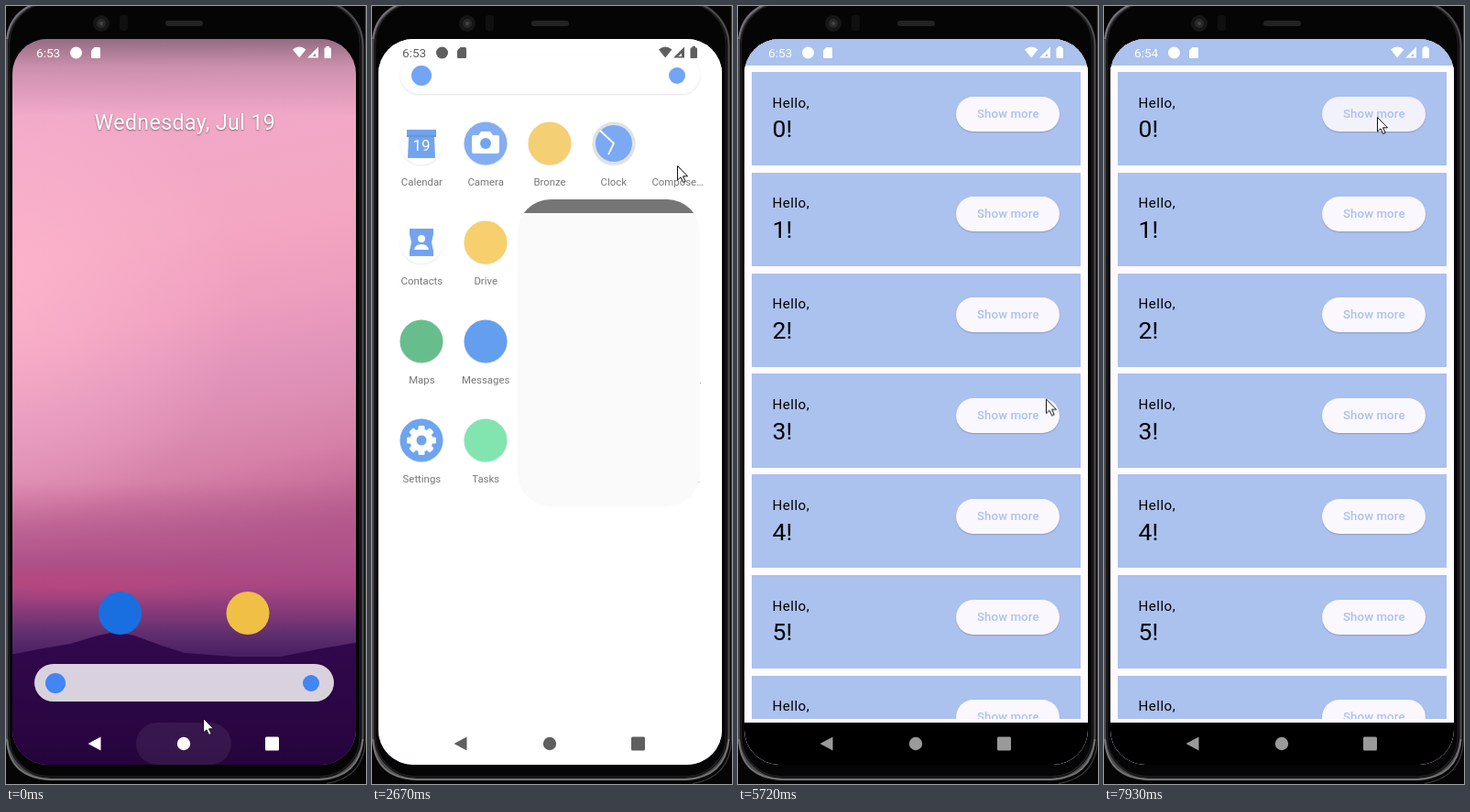
An HTML page for the animation above (8 s loop, 393 by 849 pixels).

```html
<!DOCTYPE html>
<html lang="en">
<head>
<meta charset="utf-8">
<title>Phone demo</title>
<style>
html, body { margin: 0; width: 100%; height: 100%; overflow: hidden; background: #000; }
body { position: relative; font-family: Roboto, sans-serif; }
div, svg, span { position: absolute; }
svg { overflow: visible; }
.full { left: 0; top: 0; width: 393px; height: 849px; }
.screen { clip-path: inset(36px 11px 21px 7px round 38px); }
.t { animation: 8s linear infinite; }
.s { animation: 8s step-end infinite; }

/* home */
.wall {
  background:
    linear-gradient(rgba(60,50,60,.5) 36px, rgba(60,50,60,.2) 66px, transparent 120px),
    radial-gradient(ellipse 260px 26px at 70px 632px, rgba(200,72,126,.45), transparent),
    linear-gradient(transparent 520px, rgba(176,82,138,.75) 590px, #a84883 630px, #8a3b79 658px, #64306f 682px, #4a2264 706px),
    radial-gradient(ellipse 260px 260px at 0 310px, rgba(255,184,206,.7), transparent),
    linear-gradient(168deg, #eda6c8 60px, #f0a8c8 150px, #f4a7c2 280px, #ee9ebe 370px, #e294ba 440px,
      #dd8db2 490px, #d681a8 540px, #c46d99 590px, #b45a8c 640px);
}
.date { left: 0; top: 114px; width: 391px; text-align: center; color: #fff; font-size: 23px; line-height: 28px;
  letter-spacing: .45px; text-shadow: 0 1px 2px rgba(0,0,0,.45); }
.home { animation-name: home; }
@keyframes home {
  0%, 13.75% { transform: none; opacity: 1; }
  14.75% { transform: translateY(-5px); opacity: 1; }
  17% { transform: translateY(-50px); opacity: 0; }
  100% { transform: translateY(-50px); opacity: 0; }
}

/* app drawer */
.veil { background: #fdfdfd; animation-name: veil; }
@keyframes veil { 0%, 15% { opacity: 0; } 18.5%, 100% { opacity: 1; } }
.launch { animation-name: launch; }
@keyframes launch {
  0%, 31.75% { transform: none; opacity: 1; }
  33.375% { transform: translateY(-23px); opacity: .75; }
  36.25%, 100% { transform: translateY(-46px); opacity: 0; }
}
.drawer { animation-name: drawer; }
@keyframes drawer {
  0%, 13.75% { transform: translateY(640px); }
  14.75% { transform: translateY(623px); }
  15.6% { transform: translateY(550px); }
  16.75% { transform: translateY(310px); }
  18.1% { transform: translateY(80px); }
  20%, 100% { transform: none; }
}
.sheet { left: 7px; top: 55px; width: 375px; height: 850px; border-radius: 14px 14px 0 0; background: #fff; animation-name: sheet; }
@keyframes sheet { 0%, 13.75% { opacity: 0; } 14.75% { opacity: .09; } 18%, 100% { opacity: 1; } }
.search { left: 30.5px; top: 77.5px; width: 327.5px; height: 41.5px; border-radius: 21px; background: rgba(255,255,255,.82); box-shadow: 0 1px 2px rgba(0,0,0,.16); }
.search i { position: absolute; top: 10px; left: 12.5px; width: 22px; height: 22px; border-radius: 50%; background: #4285f4; }
.search i + i { left: 293.5px; top: 12px; width: 18px; height: 18px; }
.grid { animation-name: grid; }
@keyframes grid { 0%, 13.75% { opacity: 0; } 14.75% { opacity: .17; } 17%, 100% { opacity: 1; } }
.app svg { left: -24px; top: -24px; }
.app span { left: -35px; top: 34px; width: 70px; text-align: center; font-size: 11.4px; line-height: 16px; color: #484848; }
.tap svg { animation: tap 8s step-end infinite; }
@keyframes tap { 0% { opacity: 1; } 31.75%, 100% { opacity: 0; } }

/* opening window */
.win { overflow: hidden; background: #fafafa; animation-name: win; }
.win::before { content: ""; display: block; padding-top: 7.6%; background: #757575; }
@keyframes win {
  0%, 31.74% { left: 309px; top: 148px; width: 48px; height: 48px; border-radius: 24px; opacity: 0; }
  31.75% { left: 309px; top: 148px; width: 48px; height: 48px; border-radius: 24px; opacity: 1; }
  33.375% { left: 160px; top: 212.5px; width: 198px; height: 331.5px; border-radius: 36px; opacity: 1; }
  34.3% { left: 69px; top: 106px; width: 304px; height: 590px; border-radius: 37px; opacity: 1; }
  35.4% { left: 22px; top: 51px; width: 358px; height: 750px; border-radius: 38px; opacity: 1; }
  37%, 100% { left: 7px; top: 36px; width: 375px; height: 792px; border-radius: 38px; opacity: 1; }
}
.navbar { left: 7px; top: 782px; width: 375px; height: 46px; background: #000; animation-name: navbar; }
@keyframes navbar { 0% { opacity: 0; } 38.625%, 100% { opacity: 1; } }

/* sample app */
.page { left: 7px; top: 36px; width: 375px; height: 746px; background: #fffbff; animation-name: page; }
.page::before { content: ""; display: block; height: 28.5px; background: #abc1ee; }
@keyframes page { 0% { opacity: 0; } 43%, 100% { opacity: 1; } }
.welcome { animation-name: welcome; }
@keyframes welcome { 0% { opacity: 0; } 43% { opacity: 1; } 63%, 100% { opacity: 0; } }
.body { font-size: 15.15px; line-height: 22.7px; letter-spacing: .473px; white-space: pre; }
.welcome .body { left: 0; top: 367px; width: 389px; text-align: center; color: #1c1b1f; }
.btn { height: 38px; padding: 0 22.7px; border-radius: 19px; font-weight: 500; font-size: 13.25px; line-height: 38px; letter-spacing: .095px; white-space: nowrap; }
.go { left: 144px; top: 414.5px; width: 100.5px; padding: 0; text-align: center; background: #abc1ee; color: #000; animation-name: press; }
@keyframes press { 0%, 60% { background: #abc1ee; } 61.5%, 100% { background: #9db2dd; } }
.list { left: 14.5px; top: 72px; width: 359.8px; height: 706px; overflow: hidden; animation-name: list; }
@keyframes list { 0% { opacity: 0; } 63%, 100% { opacity: 1; } }
.card { position: relative; height: 102.2px; margin-bottom: 7.6px; overflow: hidden; background: #abc1ee; color: #000; }
.card .body { left: 23px; top: 22.7px; }
.num { left: 23px; top: 45.4px; font-size: 26.5px; line-height: 34.1px; }
.card .note { left: 32.5px; top: 89px; }
.more, .less { right: 23px; top: 26.6px; background: #faf8fe; color: #abc1ee; box-shadow: 0 1px 1.5px rgba(0,0,0,.2); }
.card:first-child { animation: grow 8s linear infinite; }
.card:first-child .more { animation: more 8s step-end infinite; }
.less, .note { animation: open 8s step-end infinite; }
.less { background: #f2f2fa; }
@keyframes open { 0% { opacity: 0; } 81.875% { opacity: 1; } 94.75%, 100% { opacity: 0; } }
@keyframes more {
  0% { opacity: 1; background: #faf8fe; }
  81.875% { opacity: 0; background: #f2f2fa; }
  94.75%, 100% { opacity: 1; background: #f2f2fa; }
}
/* bouncy spring: damping .5, stiffness 200 */
@keyframes grow {
  0%, 81.87% { height: 102.2px; }
  81.875%, 81.99% { height: 143.8px; }
  82.75% { height: 156.2px; }
  83.74% { height: 182px; }
  84.61% { height: 194.6px; }
  85.49% { height: 196.2px; }
  86.36% { height: 192.8px; }
  87.24% { height: 189.4px; }
  88.11% { height: 188.1px; }
  88.99% { height: 188.2px; }
  89.86% { height: 188.8px; }
  92.375%, 94.74% { height: 189.2px; }
  94.75% { height: 147.6px; }
  95.625% { height: 132.4px; }
  96.5% { height: 109.4px; }
  96.89%, 100% { height: 102.2px; }
}

/* system bars */
.status { animation-name: status; }
@keyframes status { 0% { color: #fff; } 18.5% { color: #5f5f5f; } 37%, 100% { color: #fff; } }
.clock { left: 33px; top: 43px; font-size: 13.6px; line-height: 16px; }
.now { animation-name: now; }
.next { animation-name: next; }
@keyframes now { 0% { opacity: 1; } 96.5%, 100% { opacity: 0; } }
@keyframes next { 0% { opacity: 0; } 96.5%, 100% { opacity: 1; } }
.nav { animation-name: nav; }
@keyframes nav { 0% { color: #fff; } 18.5% { color: #5f5f5f; } 38.625% { color: #c8c8c8; } 60%, 100% { color: #9a9a9a; } }
.ripple { left: 142px; top: 782px; width: 104px; height: 46px; border-radius: 23px; background: rgba(255,255,255,.07); animation-name: ripple; }
@keyframes ripple { 0%, .9% { opacity: 1; } 5%, 100% { opacity: 0; } }

/* pointer */
.mouse { left: 0; top: 0; animation-name: mouse; }
@keyframes mouse {
  0%, .9% { transform: translate(215px, 777px); }
  5% { transform: translate(203px, 735px); }
  9.4%, 11.1% { transform: translate(194px, 683px); }
  14.75% { transform: translate(194px, 546px); }
  17.5% { transform: translate(200px, 340px); }
  20.6% { transform: translate(268px, 234px); }
  24.1%, 42.2% { transform: translate(333px, 174px); }
  49.125% { transform: translate(380px, 487px); }
  50.9%, 51.8% { transform: translate(373px, 492px); }
  58.75%, 62.1% { transform: translate(226px, 438px); }
  65.6%, 70.6% { transform: translate(336px, 446px); }
  71.5% { transform: translate(336px, 429px); }
  76% { transform: translate(318px, 270px); }
  80.1%, 100% { transform: translate(298px, 121px); }
}
.touch { animation-name: touch; }
@keyframes touch {
  0% { opacity: 0; } 10.25% { opacity: 1; } 18.1% { opacity: 0; }
  28.25% { opacity: 1; } 30% { opacity: 0; }
  59.6% { opacity: 1; } 61.25% { opacity: 0; }
  81% { opacity: 1; } 81.875%, 100% { opacity: 0; }
}
</style>
</head>
<body>
<svg class="full" viewBox="0 0 393 849">
  <rect width="393" height="849" fill="#050506"/>
  <g fill="none">
    <rect x="1" y="-5" width="388.5" height="849" rx="48" stroke="#4a494b" stroke-width="2.4"/>
    <rect x="3.5" y="-3" width="383" height="844" rx="44" stroke="#1e1e20" stroke-width="1.5"/>
    <path d="M392.500 0V800Q391 842 350 848.500" stroke="#3c3c3d" stroke-width="1.2"/>
    <path d="M1 36Q4 8 32 -3" stroke="#77707a" stroke-width="2"/>
    <path d="M1 800Q3 842 48 844H342Q386 842 389.500 800" stroke="#737374" stroke-width="2"/>
  </g>
  <circle cx="104" cy="19" r="9" fill="#161617"/>
  <circle cx="104" cy="19" r="5" fill="#29292b"/>
  <circle cx="104" cy="19" r="2" fill="#444"/>
  <rect x="124" y="10" width="9" height="17" rx="3" fill="#101011"/>
  <rect x="174" y="16" width="41" height="6" rx="3" fill="#232324"/>
</svg>

<div class="screen full">
  <div class="wall full"></div>
  <svg class="full" viewBox="0 0 393 849">
    <linearGradient id="hill" x2="0" y2="1"><stop stop-color="#33084e"/><stop offset="1" stop-color="#23043a"/></linearGradient>
    <path fill="url(#hill)" d="M0 709L35 702 70 696 100 687 120 683 140 687 170 698 195 706 250 710 300 710 340 702 393 693V849H0Z"/>
  </svg>
  <div class="home t full">
    <div class="date">Wednesday, Jul 19</div>
    <svg class="full"><circle cx="124.500" cy="662.500" r="23.500" fill="#1a6fe0"/><circle cx="264" cy="662.500" r="23.500" fill="#f0bf45"/></svg>
  </div>
  <div class="veil t full"></div>
  <div class="launch t full">
    <div class="drawer t full">
      <div class="sheet t"></div>
      <div class="search"><i></i><i></i></div>
      <div class="grid t full" id="grid"></div>
    </div>
  </div>
  <div class="ripple t"></div>
  <div class="win t"></div>
  <div class="navbar s"></div>
  <div class="page s"></div>
  <div class="welcome s full">
    <div class="body">Welcome to the Basic Taskpods!</div>
    <div class="btn go t">Continue</div>
  </div>
  <div class="list s" id="list"></div>

  <div class="status s full">
    <span class="clock now s">6:53</span><span class="clock next s">6:54</span>
    <svg class="full" viewBox="0 0 393 849" fill="currentColor">
      <circle cx="76.500" cy="51" r="6.500"/>
      <path d="M96.500 45H101.500Q103 45 103 46.500V55.500Q103 57 101.500 57H94.500Q93 57 93 55.500V48.500Z"/>
      <path d="M313 47.500Q320.200 41.500 327.400 47.500L320.200 56.500Z"/>
      <path d="M341 44.500V56.500H329ZM338 51.500L334.500 55H338Z" fill-rule="evenodd"/>
      <path d="M349.500 44H353V45.500H354Q355 45.500 355 46.500V56Q355 57 354 57H348.500Q347.500 57 347.500 56V46.500Q347.500 45.500 348.500 45.500H349.500Z"/>
    </svg>
  </div>
  <svg class="nav s full" viewBox="0 0 393 849" fill="currentColor">
    <path d="M89.500 805L103.500 797.500V812.500Z"/>
    <circle cx="194" cy="805" r="7.200"/>
    <rect x="283" y="797.500" width="15" height="15" rx="1.500"/>
  </svg>
</div>

<div class="mouse t">
  <svg width="12" height="20">
    <circle class="touch s" r="12" fill="#efb645"/>
    <path d="M.5 .5V16L4 12.800 6.700 18.500 9.200 17.300 6.600 11.800H11.500Z" fill="#fff" stroke="#111"/>
  </svg>
</div>

<script>
const disc = (color, inner = '') =>
  `<svg width="48" height="48" viewBox="-24 -24 48 48"><circle cy="1" r="23.6" fill="#000" opacity=".1"/><circle r="23.5" fill="${color}"/>${inner}</svg>`;
const blue = '#4285e8';
const teeth = [0, 45, 90, 135].map(a => `<rect x="-3.500" y="-16" width="7" height="32" rx="1.500" transform="rotate(${a})"/>`).join('');
const apps = [
  ['Calendar', disc('#fff', `<path d="M-16-15H16V-7H14L15 16H-15L-14-7H-16Z" fill="${blue}"/><path d="M-16-8H16" stroke="#2f68c4" stroke-width="1.500"/><text y="8" font-size="17" text-anchor="middle" fill="#fff">19</text>`)],
  ['Camera', disc('#5b93ee', `<path d="M-5-13H5L8-9H13Q15-9 15-7V9Q15 11 13 11H-13Q-15 11-15 9V-7Q-15-9-13-9H-8Z" fill="#fff"/><circle r="6" fill="${blue}"/>`)],
  ['Bronze', disc('#f0bf45')],
  ['Clock', disc('#d5d8dc', `<circle r="20" fill="#4f8cf0"/><path d="M-15-14L0 0L-6 12" fill="none" stroke="#fff" stroke-width="1.800"/>`)],
  ['Compose…', disc('#e9e6ec')],
  ['Contacts', disc('#fff', `<path d="M-13-15H13V-9L11 0L13 9V15H-13V9L-11 0L-13-9Z" fill="${blue}"/><circle cy="-4" r="4" fill="#fff"/><path d="M-8 8Q-7 2 0 2T8 8Z" fill="#fff"/>`)],
  ['Drive', disc('#f4bf3a')],
  ['Files', disc(blue)],
  ['Inbox', disc('#e8695f')],
  ['Globe', disc('#e8e8ea')],
  ['Maps', disc('#34a865')],
  ['Messages', disc('#2f7de9')],
  ['Phone', disc(blue)],
  ['Photos', disc('#f0c04a')],
  ['Pocket S…', disc('#e8e8ea')],
  ['Settings', disc('#3d85ea', `<g fill="#fff">${teeth}<circle r="12.500"/></g><circle r="5.500" fill="#3d85ea"/>`)],
  ['Tasks', disc('#58dc94')],
  ['Video', disc('#e8695f')],
  ['Voice', disc(blue)],
  ['Weather…', disc('#e8e8ea')]
];
grid.innerHTML = apps.map(([name, icon], i) =>
  `<div class="app${i === 4 ? ' tap' : ''}" style="left:${54.4 + i % 5 * 69.8}px;top:${172.5 + (i / 5 | 0) * 108}px">${icon}<span>${name}</span></div>`).join('');

const extra = '<div class="body note">You can see now! o/</div><div class="btn less">Show less</div>';
list.innerHTML = Array.from({ length: 7 }, (_, i) =>
  `<div class="card"><div class="body">Hello,</div><div class="num">${i}!</div><div class="btn more">Show more</div>${i ? '' : extra}</div>`).join('');
</script>
</body>
</html>
```
